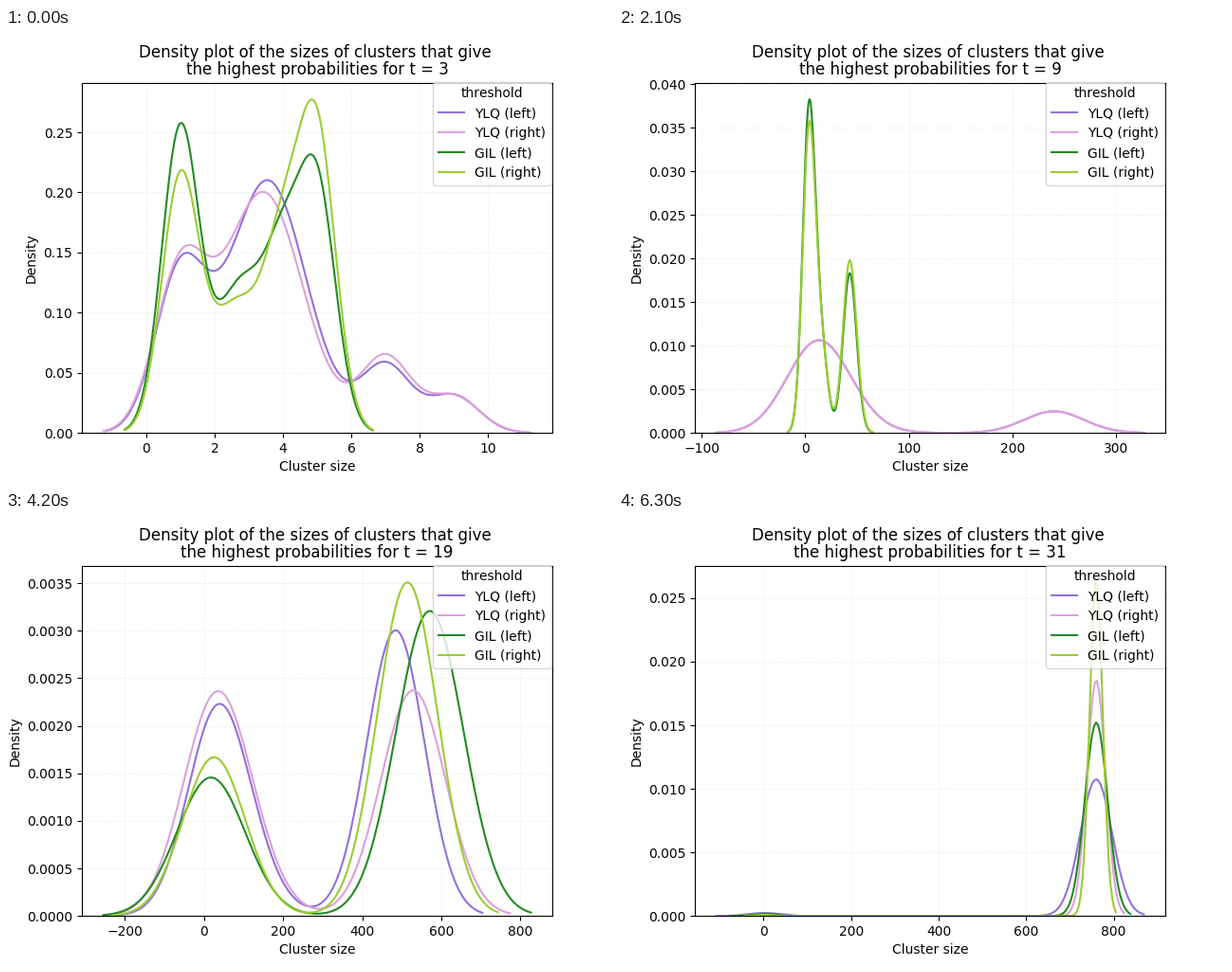
A matplotlib script that plays this animation: 640x480 px, repeating every 7 s.

```python
import numpy as np
import matplotlib.pyplot as plt
from matplotlib.animation import FuncAnimation

plt.rcParams["text.kerning_factor"] = 6

LABELS = ["YLQ (left)", "YLQ (right)", "GIL (left)", "GIL (right)"]
COLORS = ["mediumpurple", "plum", "forestgreen", "yellowgreen"]
STEP_MS = 700
RUNS = 250                                  # simulated runs per curve
SCOTT = RUNS ** -0.2                        # bandwidth over standard deviation
U = (np.arange(60) + 0.5) / 60
TAIL = (-np.log(1 - U)) ** (1 / 1.2)        # spread of the small clusters


def density(small, *groups):
    """Kernel density of cluster sizes.

    Each group is (share, size[, spread]); all other runs end in small
    clusters, from size 1 up, on the scale of `small`.
    """
    share, size, spread = np.array([(*g, 0)[:3] for g in groups]).T
    rest = 1 - share.sum()
    w = np.r_[np.full(U.size, rest / U.size), share]
    c = np.r_[1 + small * TAIL, size]
    s = np.r_[np.zeros(U.size), spread]

    mean = w @ c
    bw = SCOTT * np.sqrt(w @ ((c - mean) ** 2 + s ** 2))
    x = np.linspace(1 - 3 * bw, (size + 1.6 * spread).max() + 3 * bw, 200)
    width = np.hypot(bw, s)
    z = (x[:, None] - c) / width
    return x, np.exp(-z ** 2 / 2) @ (w / width) / np.sqrt(2 * np.pi)


scenes = []


def scene(t, *curves):
    scenes.append((t, curves))


scene(3,
      density(0, (.60, 3.55, .87), (.104, 7), (.057, 9)),
      density(0, (.58, 3.43, .88), (.119, 7), (.057, 9)),
      density(0, (.21, 2.74, .44), (.173, 4), (.273, 5)),
      density(0, (.19, 2.63, .48), (.191, 4), (.333, 5)))

ylq = density(4, (.10, 50))
scene(5, ylq, ylq,
      density(.8, (.15, 5, .6), (.35, 9, .6)),
      density(.8, (.14, 5, .6), (.40, 9, .6)))

ylq = density(9, (.142, 175.5))
scene(7, ylq, ylq,
      density(1.8, (.055, 9), (.32, 16.8, 1.5), (.074, 27.8)),
      density(1.8, (.040, 9), (.365, 16.8, 1.4), (.073, 27.8)))

ylq = density(14, (.18, 240))
scene(9, ylq, ylq,
      density(3.5, (.10, 17), (.30, 43, 3)),
      density(3.5, (.10, 17), (.33, 43, 3)))

ylq = density(20, (.236, 306))
scene(12, ylq, ylq,
      density(6.5, (.09, 40), (.342, 102.5, 5)),
      density(6.8, (.09, 40), (.358, 102.5, 5)))

scene(15,
      density(56, (.234, 308.5)), density(60, (.234, 309.5)),
      density(25, (.369, 254.5)), density(30, (.391, 254.5)))

scene(19,
      density(46, (.55, 484.5)), density(40, (.485, 529)),
      density(18, (.685, 571)), density(27, (.67, 514.5)))

scene(23,
      density(8, (.902, 735.5)), density(10, (.898, 737)),
      density(43, (.866, 685)), density(52, (.81, 680.5)))

scene(27,
      density(4, (.955, 755)), density(6, (.95, 755)),
      density(18, (.955, 740)), density(24, (.93, 736)))

scene(31, *[density(2, (1 - p, 760)) for p in (.0214, .0073, .0108, .0036)])

fig, ax = plt.subplots(figsize=(6.4, 4.8), dpi=100)


def draw(i):
    t, curves = scenes[i]
    ax.clear()
    for (x, y), label, color in zip(curves, LABELS, COLORS):
        ax.plot(x, y, color=color, label=label)
    ax.set_ylim(0, 1.05 * max(y.max() for _, y in curves))
    ax.grid(color="lightgray", linestyle="--", linewidth=0.5, alpha=0.4)
    ax.set_xlabel("Cluster size")
    ax.set_ylabel("Density")
    ax.set_title("Density plot of the sizes of clusters that give \n"
                 f"the highest probabilities for t = {t}", linespacing=1.0)
    ax.legend(title="threshold", loc="upper right", borderaxespad=0,
              bbox_to_anchor=(0.998, 1.002))
    return ax.get_children()


anim = FuncAnimation(fig, draw, frames=len(scenes), interval=STEP_MS,
                     repeat=True, repeat_delay=0)
plt.show()
```
